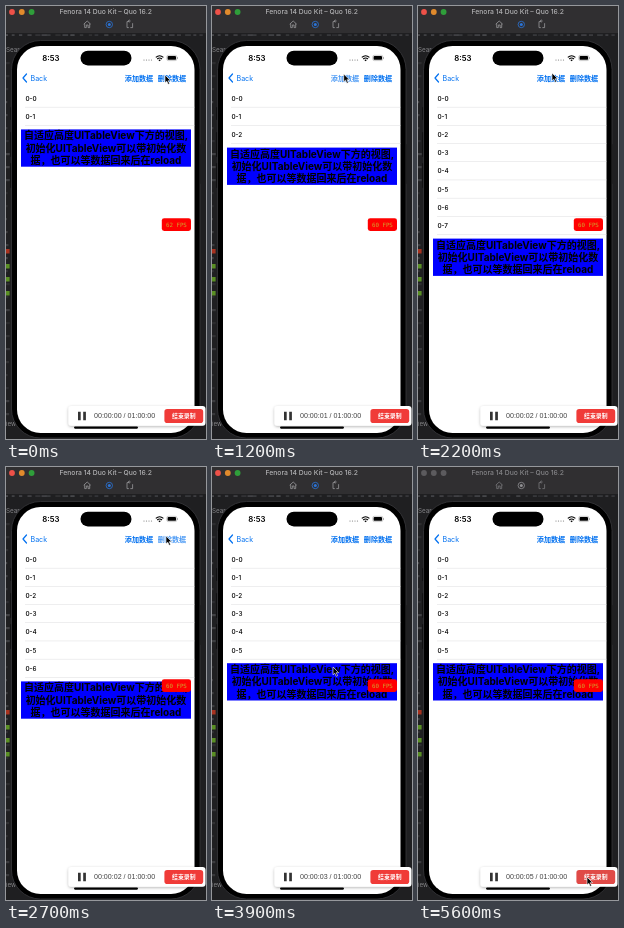
Animation, 200 px wide and 433 px high, one loop 5.7 s. Source, as an HTML page:

```html
<!DOCTYPE html>
<html lang="zh">
<head>
<meta charset="utf-8">
<title>Table view demo</title>
<style>
  html, body { margin: 0; width: 100%; height: 100%; overflow: hidden; background: #1f1f21; }
  svg { display: block; width: 100vw; height: 100vh; }
  text { font-family: Inter, "Noto Sans CJK SC", "Noto Sans CJK", sans-serif; }
  .mono { font-family: "DejaVu Sans Mono", monospace; }
  .clock { font-family: "Liberation Sans", Arial, sans-serif; }
</style>
</head>
<body>
<svg id="stage" viewBox="0 0 200 433" preserveAspectRatio="none">
  <defs>
    <filter id="soft" x="-10%" y="-40%" width="120%" height="190%">
      <feDropShadow dx="0" dy="1" stdDeviation="1.6" flood-opacity=".3"/>
    </filter>
  </defs>
  <rect width="200" height="433" fill="#1f1f21"/>
  <g id="editor"></g>

  <!-- window bar -->
  <rect width="200" height="27" fill="#302f31"/>
  <g id="lights"></g>
  <text id="title" x="99.7" y="7.9" font-size="6.8" font-weight="500" text-anchor="middle">Fenora 14 Duo Kit – Quo 16.2</text>
  <g id="tools" fill="none" stroke-width=".8" stroke-linejoin="round">
    <path d="M77.7 18.2 81.2 15 84.7 18.2M78.7 17.5V21.6H80.3V19H82.1V21.6H83.7V17.5"/>
    <g id="record"><circle cx="103.3" cy="18.5" r="3.2"/><circle cx="103.3" cy="18.5" r="1.5" fill="currentColor" stroke="none"/></g>
    <path d="M122.8 15.6H121V21.6H122.8M124.4 21.6H126.6V17.2M124.6 15H122.4M123.6 13.8 122.2 15 123.6 16.2"/>
  </g>

  <!-- phone -->
  <g fill="#111112">
    <rect x="4" y="101" width="3" height="13" rx="1"/>
    <rect x="4" y="126" width="3" height="25" rx="1"/>
    <rect x="4" y="157" width="3" height="25" rx="1"/>
    <rect x="192" y="138" width="3" height="40" rx="1"/>
  </g>
  <rect x="5.5" y="34.5" width="188.5" height="397.5" rx="29" fill="#000" stroke="#38383b" stroke-width=".8"/>
  <rect x="11" y="40" width="177.5" height="387" rx="23.5" fill="#fff"/>
  <rect x="74.5" y="44.7" width="51" height="14.8" rx="7.4" fill="#000"/>
  <text x="36.3" y="55" font-size="7.8" font-weight="600">8:53</text>
  <g fill="#777">
    <circle cx="138" cy="54" r=".6"/><circle cx="140.5" cy="54" r=".6"/>
    <circle cx="143" cy="54" r=".6"/><circle cx="145.5" cy="54" r=".6"/>
  </g>
  <path d="M149.8 51.4Q153.6 48 157.4 51.4M151.2 53Q153.6 50.9 156 53" fill="none" stroke="#000" stroke-width="1.1"/>
  <path d="M152.3 53.9Q153.6 52.9 154.9 53.9L153.6 55.3Z"/>
  <rect x="160.8" y="49.3" width="10" height="5.3" rx="1.5" fill="none" stroke="#999" stroke-width=".5"/>
  <rect x="161.6" y="50.1" width="8.4" height="3.7" rx=".9"/>
  <path d="M171.5 51v2" stroke="#999" stroke-width=".7"/>
  <g fill="#0070f0" font-size="7.1">
    <path d="M20.5 68 17 72l3.5 4" fill="none" stroke="#0070f0" stroke-width="1.2" stroke-linecap="round" stroke-linejoin="round"/>
    <text x="24.5" y="74.6">Back</text>
    <text id="add" x="118.8" y="74.7" font-weight="700">添加数据</text>
    <text id="del" x="151.8" y="74.7" font-weight="700">删除数据</text>
  </g>
  <g id="rows"></g>
  <g id="footer" font-size="10" font-weight="700" text-anchor="middle">
    <rect x="15" width="170" height="37.3" fill="#00f"/>
    <text x="100" y="9.9">自适应高度UITableView下方的视图,</text>
    <text x="100" y="22.3">初始化UITableView可以带初始化数</text>
    <text x="100" y="34.7">据，也可以等数据回来后在reload</text>
  </g>
  <rect x="155.8" y="212.2" width="29.2" height="12.8" rx="2.4" fill="#f00"/>
  <text id="fps" class="mono" x="170.4" y="220.7" font-size="5.8" text-anchor="middle" fill="#cfa52c"></text>
  <rect x="68" y="420.5" width="64" height="2.2" rx="1.1"/>

  <!-- recorder -->
  <rect x="62.5" y="400" width="137" height="19.8" rx="3" fill="#fff" filter="url(#soft)"/>
  <path d="M72 405.8h2.7v8.4H72zM77.2 405.8h2.7v8.4h-2.7z" fill="#333"/>
  <text id="clock" class="clock" x="88" y="412.4" font-size="7.1" fill="#444"></text>
  <rect id="stop" x="158.4" y="403" width="38.8" height="14" rx="2.8" fill="#f03b38"/>
  <text x="177.8" y="412.1" font-size="5.9" font-weight="700" fill="#fff" text-anchor="middle">结束录制</text>
  <path id="cursor" d="M0 0V7.8L1.8 6.2 3.2 9.3 4.6 8.7 3.2 5.7H5.7Z" stroke="#fff" stroke-width=".6" stroke-linejoin="round"/>
</svg>
<script>
const LOOP = 5700, STEP = 100, PITCH = 18.2;
const $ = id => document.getElementById(id);

function make(parent, tag, attrs, label) {
  const node = document.createElementNS("http://www.w3.org/2000/svg", tag);
  for (const key in attrs) node.setAttribute(key, attrs[key]);
  if (label) node.textContent = label;
  parent.append(node);
  return node;
}

// [time, value] steps; each value holds until the next
const counts = [[0, 2], [200, 1], [400, 0], [800, 1], [1000, 2], [1200, 3], [1400, 4],
  [1600, 5], [1800, 6], [2000, 7], [2100, 8], [2700, 7], [2900, 6]];
const rates = [[0, 62], [1000, 60], [4000, 62], [5000, 60]];
const addTaps = [800, 1000, 1200, 1400, 1600, 1800, 2000];
const delTaps = [200, 400, 2700, 2900];

// [time, x, y] of the pointer tip
const path = [[0, 159, 69], [400, 158, 69], [600, 133, 68], [1600, 131, 68], [2200, 134, 67],
  [2400, 135, 68], [2600, 160, 69], [2900, 160, 69], [3200, 112, 170], [3600, 112, 178],
  [4200, 130, 222], [4600, 133, 228], [4900, 135, 240], [5400, 169, 409], [5600, 169, 410]];

const held = (steps, t) => steps.filter(s => s[0] <= t).pop()[1];

function pointer(t) {
  const i = path.findIndex(p => p[0] > t);
  if (i < 0) return path[path.length - 1].slice(1);
  const [a, b] = [path[i - 1], path[i]];
  const u = (t - a[0]) / (b[0] - a[0]), e = u * u * (3 - 2 * u);
  return [a[1] + (b[1] - a[1]) * e, a[2] + (b[2] - a[2]) * e];
}

// slivers of the editor behind the window
let seed = 7;
const rand = () => (seed = seed * 16807 % 2147483647) / 2147483647;
const editor = $("editor");
for (let x = 0; x < 198; x += 4 + rand() * 6)
  make(editor, "rect", { x, y: 28.2, width: 2 + rand() * 4, height: 1.8, fill: "#5b5c61", opacity: .2 + rand() * .5 });
for (let y = 56; y < 410; y += 13)
  make(editor, "rect", { x: 0, y, width: 1 + rand() * 3, height: 2.2, fill: "#5c5d61", opacity: .2 + rand() * .4 });
[[45.5, "Sear"], [420, "iew do"]].forEach(([y, label]) =>
  make(editor, "text", { x: 0, y, "font-size": 6.3, fill: "#858588" }, label));
[[243, "#a8321f"], [258, "#5a8f24"], [271, "#5a8f24"], [285, "#5a8f24"]].forEach(([y, fill]) =>
  make(editor, "rect", { x: 0, y, width: 3.6, height: 4.5, fill }));

const lightColors = ["#ee5148", "#e08a2c", "#2f9e3a"];
const lights = lightColors.map((fill, i) =>
  make($("lights"), "circle", { cx: 6 + i * 9.8, cy: 6, r: 2.9, fill }));

const rows = Array.from({ length: 8 }, (_, i) => {
  const g = make($("rows"), "g", { transform: `translate(0 ${83 + i * PITCH})` });
  make(g, "text", { x: 19.4, y: 11.5, "font-size": 6.4, "font-weight": 500 }, "0-" + i);
  make(g, "rect", { x: 19, y: 17.9, width: 169.5, height: .5, fill: "#dcdcdf" });
  return g;
});

function draw(t) {
  const n = held(counts, t), active = t < 5500;
  rows.forEach((row, i) => row.setAttribute("visibility", i < n ? "visible" : "hidden"));
  $("footer").setAttribute("transform", `translate(0 ${87 + n * PITCH})`);
  $("fps").textContent = held(rates, t) + " FPS";
  $("clock").textContent = `00:00:0${Math.floor(t / 1000)} / 01:00:00`;
  $("add").setAttribute("opacity", addTaps.includes(t) ? .7 : 1);
  $("del").setAttribute("opacity", delTaps.includes(t) ? .7 : 1);
  $("cursor").setAttribute("transform", `translate(${pointer(t)})`);
  $("stop").setAttribute("fill", active ? "#f03b38" : "#e04a47");
  $("title").setAttribute("fill", active ? "#b2b2b4" : "#858588");
  $("tools").setAttribute("stroke", active ? "#98989b" : "#77777a");
  const accent = active ? "#2a74d8" : "#909093";
  $("record").setAttribute("stroke", accent);
  $("record").setAttribute("color", accent);
  lights.forEach((c, i) => c.setAttribute("fill", active ? lightColors[i] : "#5c5b5e"));
}

const start = performance.now();
function tick() {
  const t = (performance.now() - start) % LOOP;
  draw(Math.floor(t / STEP) * STEP);
  requestAnimationFrame(tick);
}
tick();
</script>
</body>
</html>
```
